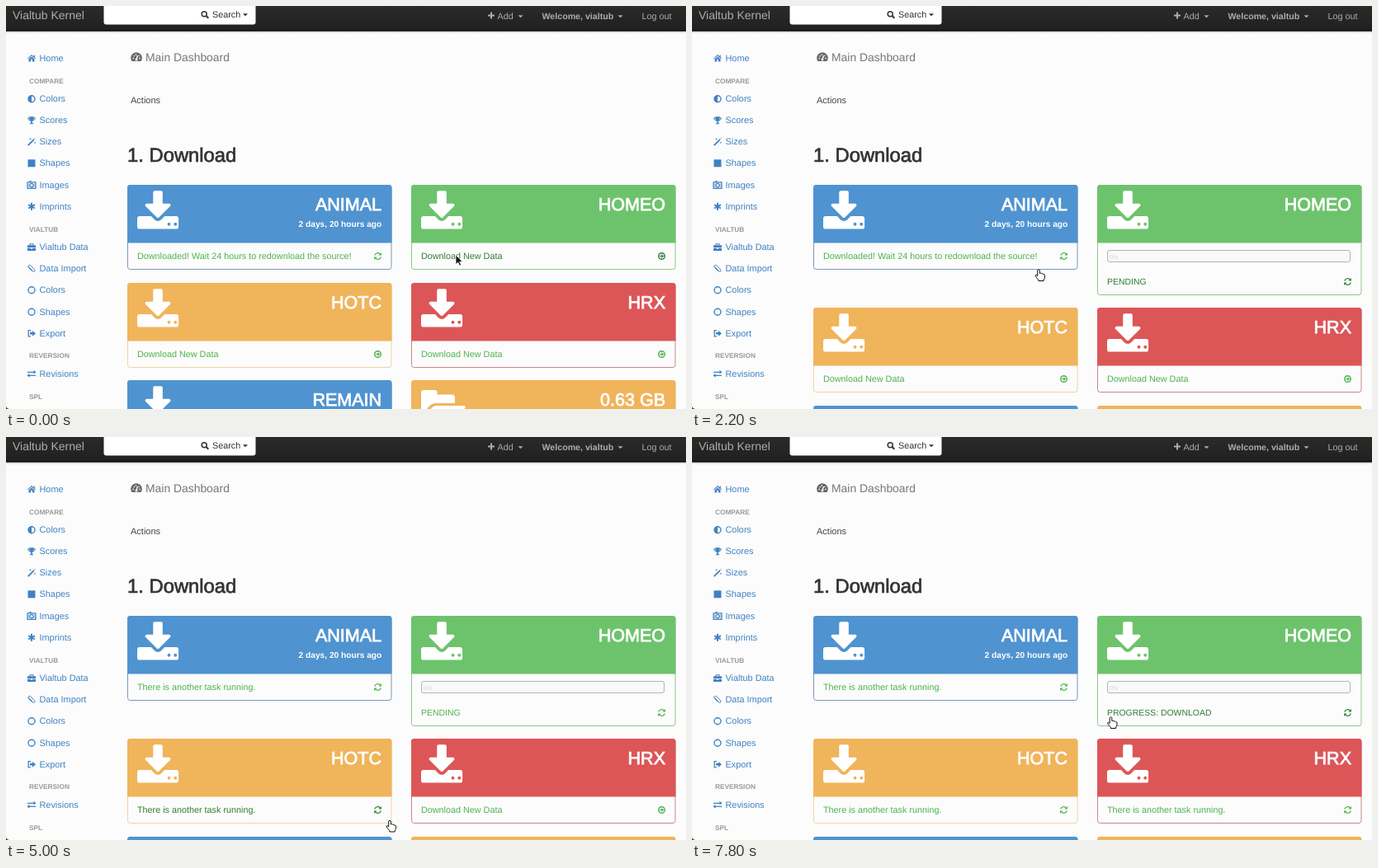
Recreate the animation shown at these times as an HTML page. Size 824 by 489 pixels, loop 8000 ms.

```html
<!DOCTYPE html>
<html lang="en">
<head>
<meta charset="utf-8">
<title>Dashboard</title>
<style>
html, body { margin: 0; width: 100%; height: 100%; overflow: hidden; background: #fcfcfc; }
svg { display: block; width: 100%; height: 100%; font-family: "Liberation Sans", Arial, sans-serif; }
</style>
</head>
<body>
<svg id="stage" viewBox="0 0 824 489" text-rendering="geometricPrecision">
  <defs>
    <linearGradient id="bar" x2="0" y2="1">
      <stop offset="0" stop-color="#2a2a2a"/><stop offset="1" stop-color="#202020"/>
    </linearGradient>
    <linearGradient id="shade" x2="0" y2="1">
      <stop offset="0" stop-color="#000" stop-opacity=".2"/><stop offset="1" stop-color="#000" stop-opacity="0"/>
    </linearGradient>
  </defs>
  <rect width="824" height="489" fill="#fcfcfc"/>
  <g id="page"></g>
  <g id="cards"></g>
  <path d="M0 485.500Q.5 488.500 4 489H0z" fill="#333"/>
  <g id="pointer" stroke="#111" stroke-linejoin="round">
    <path id="arrow" d="M0 0V11.500L2.700 9.100 4.500 13.200 6.500 12.300 4.700 8.400H8.200z" fill="#111" stroke="#fff" stroke-width=".8"/>
    <path id="hand" d="M-1.300 1Q0-.8 1.300 1V5L2.500 4.600Q3.500 4.600 3.800 5.500 5.200 4.900 5.800 6.100 7.300 5.700 7.500 7.300V9.500Q7.300 11.500 6.200 12.500V14H-.2V12.600Q-2 11-3.800 8.300-4.300 6.700-2.800 6.700L-1.300 8z" fill="#fff"/>
  </g>
</svg>
<script>
const $ = id => document.getElementById(id);
const BLUE = '#3f82c3', LINK = '#4db24d', HOVER = '#2f7d32', NAV = '#adadad';
const LOOP = 8000, STEP = 200;

const text = (x, y, size, fill, str, extra = '') =>
  `<text x="${x}" y="${y}" font-size="${size}" fill="${fill}" ${extra}>${str}</text>`;
const solid = d => `<path d="${d}" fill="currentColor"/>`;
const line = (d, w = 1.4) => `<path d="${d}" fill="none" stroke="currentColor" stroke-width="${w}"/>`;
const ring = r => `<circle r="${r}" fill="none" stroke="currentColor" stroke-width="1.4"/>`;
const icon = (x, y, name, color) => `<g transform="translate(${x} ${y})" color="${color}">${icons[name]}</g>`;

const icons = {
  home: solid('M-5 .4L0-4.200 2.500-2V-3.800H3.800V-.8L5 .4 4.300 1 0-2.800-4.300 1zM-3.500 1.200L0-1.900 3.500 1.200V4.200H1V1.500H-1V4.200H-3.500z'),
  half: ring(4) + solid('M0-4A4 4 0 0 0 0 4z'),
  trophy: solid('M-2.800-4.500H2.800Q2.800 .2.800 1.200V2.800L2.500 4.500H-2.500L-.8 2.800V1.200Q-2.800 .2-2.800-4.500z') + line('M-2.500-3H-4.400Q-4.300-.3-1.500.2M2.500-3H4.400Q4.300-.3 1.500.2', 1),
  wand: line('M-4.300 4.300L3 -3', 1.800) + line('M-1.500-4.500V-2.500M-2.500-3.500H-.5M4 .2V1.800M3.200 1H4.800M4-4.800V-3.400', .8),
  square: solid('M-4.500-4.500H4.500V4.500H-4.500z'),
  photo: line('M-5-3.500H5V4H-5z', 1.200) + line('M-3-4.500H0', 1.200) + '<circle cy=".3" r="2.300" fill="none" stroke="currentColor" stroke-width="1.300"/>' + line('M-4-2V3M4-2V3', .7),
  star: line('M0-4.500V4.500M-3.900-2.200L3.900 2.200M-3.900 2.200L3.900-2.200', 2),
  case: solid('M-5-2.500H5V.3H-5zM-5 1H-1V2H1V1H5V4.300H-5z') + line('M-2-2.500V-4H2V-2.500', 1.100),
  clip: line('M-3.500-2.500L1.500 3Q3 4.200 3.800 3 4.500 2 3.200.6L-1.300-4Q-2.700-5-3.800-3.800-4.700-2.500-3.500-1.200L.8 3', 1),
  circle: ring(4),
  exit: line('M-1-3.600H-3.800V3.600H-1', 1.300) + solid('M-2-1.200H1V-3.400L5 0 1 3.400V1.200H-2z'),
  swap: line('M-5-2H3M5 2H-3', 1.300) + solid('M2.500-4.500L5.500-2 2.500 .2zM-2.500-.2L-5.500 2-2.500 4.500z'),
  search: '<circle cx="-.8" cy="-.8" r="3" fill="none" stroke="currentColor" stroke-width="1.500"/>' + line('M1.500 1.500L4.300 4.300', 2),
  plus: line('M-4 0H4M0-4V4', 2),
  caret: solid('M-3-1.300H3L0 1.700z'),
  gauge: solid('M-5.500 4.500A6.800 6.800 0 1 1 5.500 4.500z') + '<path d="M0 2.500L1.500-2.500M-4.500 1H-3M3.200 1H4.700M-3.300-2.300L-2.300-1.300M-.6-4.300V-2.800M3.500-2.500L2.700-1.700" stroke="#fcfcfc" stroke-width="1.400"/><circle cy="2.600" r="1.500" fill="#fcfcfc"/>',
  refresh: line('M-3.800-.8A3.900 3.900 0 0 1 2.800-2.700M3.800 .8A3.900 3.900 0 0 1-2.800 2.700', 1.200) + solid('M4.400-4.400V-1H1zM-4.400 4.400V1H-1z'),
  go: ring(3.800) + line('M-2.300 0H1.500', 1.300) + solid('M0-2.400L2.600 0 0 2.400z'),
};

// Navigation bar, sidebar and headings
const menu = [
  ['Home', 63, 'home'], ['COMPARE', 91], ['Colors', 112.5, 'half'], ['Scores', 138.5, 'trophy'],
  ['Sizes', 164.5, 'wand'], ['Shapes', 190.5, 'square'], ['Images', 217, 'photo'], ['Imprints', 243, 'star'],
  ['VIALTUB', 271], ['Vialtub Data', 292.5, 'case'], ['Data Import', 318.5, 'clip'], ['Colors', 344.5, 'circle'],
  ['Shapes', 371, 'circle'], ['Export', 397, 'exit'], ['REVERSION', 424.5], ['Revisions', 446, 'swap'], ['SPL', 474],
];
$('page').innerHTML =
  '<rect width="824" height="30.500" fill="url(#bar)"/><rect y="29" width="824" height="1.500" fill="#0c0c0c"/>' +
  '<rect y="30.500" width="824" height="3" fill="url(#shade)"/>' +
  '<path d="M118.500 0H302.500V19.500Q302.500 22.500 299.500 22.500H121.500Q118.500 22.500 118.500 19.500z" fill="#fff"/>' +
  text(8, 15.5, 14, NAV, 'Vialtub Kernel') +
  icon(241, 10.5, 'search', '#333') + text(250, 13.7, 10.8, '#333', 'Search') + icon(290, 10.5, 'caret', '#333') +
  icon(588, 11.5, 'plus', NAV) + text(595.5, 15.6, 10.8, NAV, 'Add') + icon(623.5, 12.5, 'caret', NAV) +
  text(649.5, 15.6, 10.65, NAV, 'Welcome, vialtub', 'font-weight="bold"') + icon(744.5, 12.5, 'caret', NAV) +
  text(770.5, 15.6, 10.8, NAV, 'Log out') +
  icon(158, 62.5, 'gauge', '#666') + text(169, 66.6, 13.9, '#777', 'Main Dashboard') +
  text(151, 117.7, 11, '#444', 'Actions') +
  text(147, 188.6, 23.8, '#333', '1. Download', 'stroke="#333" stroke-width=".7"') +
  menu.map(([label, y, name]) => name
    ? icon(31, y + .3, name, BLUE) + text(40.5, y + 3.9, 10.9, BLUE, label)
    : text(28, y + 2.6, 8.3, '#999', label, 'font-weight="bold"')).join('');

const drive = color =>
  `<g transform="translate(12 7.300) scale(.0301)" fill="#fff">
   <path d="M1664 1120V1440Q1664 1536 1568 1536H96Q0 1536 0 1440V1120Q0 1024 96 1024H561L696 1160Q754 1216 832 1216T968 1160L1104 1024H1568Q1664 1024 1664 1120z"/>
   <path d="M1339 551Q1356 592 1325 621L877 1069Q859 1088 832 1088T787 1069L339 621Q308 592 325 551 342 512 384 512H640V64Q640 0 704 0H960Q1024 0 1024 64V512H1280Q1322 512 1339 551z"/>
   <g fill="${color}"><circle cx="1280" cy="1344" r="64"/><circle cx="1536" cy="1344" r="64"/></g></g>`;
const folder = () =>
  `<path d="M12 44V15Q12 12 15 12H28.500Q31.500 12 31.500 15V17.500H49Q53 17.500 53 21.500V28H30Q25 28 21.500 32z" fill="#fff"/>
   <path d="M15 49L24.500 34Q27 31 31 31H63.500Q67 31 65 34L55 47Q53 49 50 49z" fill="#fff"/>`;

const READY = 'Download New Data', BUSY = 'There is another task running.';
const between = (t, a, b) => t >= a && t < b;

const cards = [
  { title: 'ANIMAL', sub: '2 days, 20 hours ago', col: 0, row: 0, color: '#4f93d0', edge: '#7d98b8',
    label: t => t < 3000 ? 'Downloaded! Wait 24 hours to redownload the source!' : BUSY,
    fresh: () => true, hover: t => between(t, 2400, 3400) },
  { title: 'HOMEO', col: 1, row: 0, color: '#6dc36c', edge: '#8cc78b', tall: true,
    label: t => t < 200 ? READY : t < 7200 ? 'PENDING' : 'PROGRESS: DOWNLOAD',
    fresh: t => t >= 200, hover: t => t < 2400 || t >= 6400 },
  { title: 'HOTC', col: 0, row: 1, color: '#f0b45b', edge: '#f2d3a0',
    label: t => t < 4600 ? READY : BUSY, fresh: t => t >= 4600, hover: t => between(t, 4200, 5200) },
  { title: 'HRX', col: 1, row: 1, color: '#dc5658', edge: '#c98688',
    label: t => t < 5600 ? READY : BUSY, fresh: t => t >= 5600, hover: t => between(t, 5400, 6000) },
  { title: 'REMAIN', col: 0, row: 2, color: '#4f93d0', edge: '#7d98b8',
    label: () => READY, fresh: () => false, hover: () => false },
  { title: '0.63 GB', col: 1, row: 2, color: '#f0b45b', edge: '#f2d3a0', art: folder,
    label: () => READY, fresh: () => false, hover: () => false },
];

$('cards').innerHTML = cards.map(c => `<g>
  <rect class="box" x=".5" y=".5" width="319.500" height="102" rx="3" fill="#fcfcfc" stroke="${c.edge}"/>
  <path d="M0 70.500V3.500Q0 0 3.500 0H317Q320.500 0 320.500 3.500V70.500z" fill="${c.color}"/>
  ${(c.art || drive)(c.color)}
  ${text(308, 31, 21.5, '#fff', c.title, 'text-anchor="end" stroke="#fff" stroke-width=".8"')}
  ${c.sub ? text(308.3, 50.5, 10.2, '#fff', c.sub, 'text-anchor="end" font-weight="bold"') : ''}
  <g class="meter"><rect x="12.500" y="79.500" width="294" height="14" rx="2.500" fill="#f9f9f9" stroke="#b4b4b4"/>
  ${text(15, 89.5, 7, '#d4d4d4', '0%')}</g>
  <g class="foot">${text(12, 90.2, 10.8, 'currentColor', '', 'class="label"')}
  <g class="fresh" transform="translate(303.500 86.500)">${icons.refresh}</g>
  <g class="go" transform="translate(303.500 86.500)">${icons.go}</g></g></g>`).join('');

cards.forEach((c, i) => {
  c.el = $('cards').children[i];
  for (const k of ['box', 'meter', 'foot', 'label', 'fresh', 'go']) c[k + 'El'] = c.el.querySelector('.' + k);
});

const show = (el, on) => el.setAttribute('display', on ? 'inline' : 'none');

// Pointer path: time, x, y, over a link
const path = [
  [0, 545, 302, 0], [200, 551, 303, 1], [1400, 551, 303, 1], [1800, 480, 312, 0], [2000, 455, 316, 1],
  [2200, 420, 319.5, 1], [2800, 330, 303, 1], [3200, 320, 304, 1], [3600, 290, 350, 0], [4000, 270, 442, 0],
  [4200, 276, 450, 1], [4600, 330, 455, 1], [5000, 465, 465, 1], [5200, 480, 462, 0], [5400, 530, 455, 1],
  [5800, 545, 452, 1], [6000, 545, 425, 0], [6400, 532, 340, 1], [6600, 528.5, 333, 1], [7800, 507.5, 339.5, 1],
  [LOOP, 507.5, 339.5, 1],
];

function render(t) {
  const open = t >= 200;
  for (const c of cards) {
    const tall = c.tall && open, y = Math.round(217 + c.row * 118.5 + (c.row && open ? 30.5 : 0));
    c.el.setAttribute('transform', `translate(${147 + c.col * 344} ${y})`);
    c.boxEl.setAttribute('height', tall ? 133 : 102);
    show(c.meterEl, tall);
    c.footEl.setAttribute('transform', `translate(0 ${tall ? 31 : 0})`);
    c.footEl.setAttribute('color', c.hover(t) ? HOVER : LINK);
    c.labelEl.textContent = c.label(t);
    c.labelEl.setAttribute('font-size', tall ? 10.45 : 10.8);
    show(c.freshEl, c.fresh(t));
    show(c.goEl, !c.fresh(t));
  }
  const i = path.findIndex((p, n) => t >= p[0] && t < path[n + 1][0]);
  const [a, b] = [path[i], path[i + 1]], k = (t - a[0]) / (b[0] - a[0]);
  $('pointer').setAttribute('transform', `translate(${a[1] + (b[1] - a[1]) * k} ${a[2] + (b[2] - a[2]) * k})`);
  show($('hand'), a[3]);
  show($('arrow'), !a[3]);
}

const start = performance.now();
let last = 0;
function tick() {
  const t = Math.floor((performance.now() - start) % LOOP / STEP) * STEP;
  if (t !== last) render(last = t);
  requestAnimationFrame(tick);
}
render(0);
tick();
</script>
</body>
</html>
```
